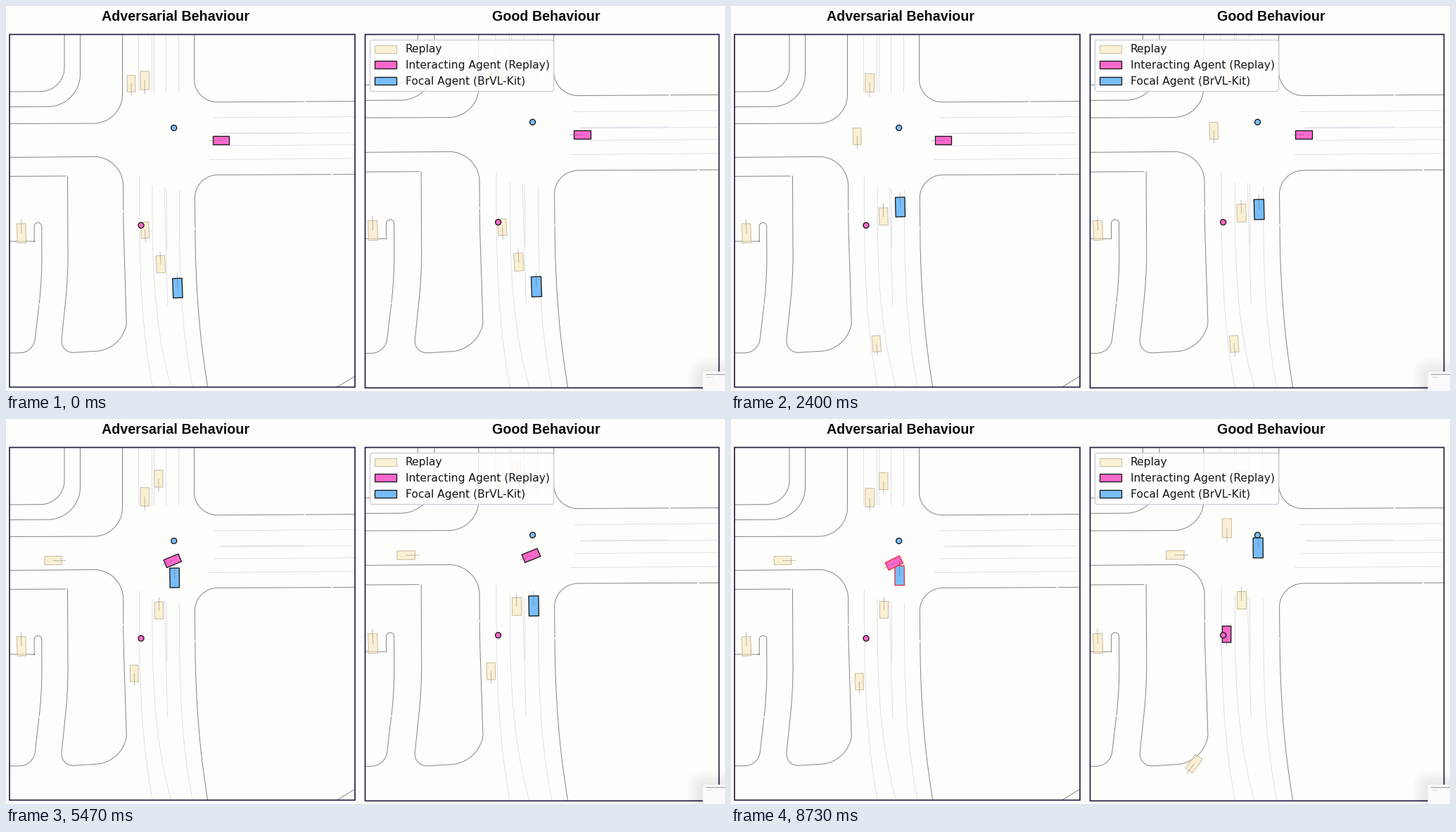
Recreate the animation shown at these times as a matplotlib script. Size 1022 by 548 pixels, loop 8.8 s.

```python
import numpy as np
import matplotlib.pyplot as plt
from matplotlib.animation import FuncAnimation
from matplotlib.patches import Circle, FancyBboxPatch, Polygon, Rectangle

W, H, DPI = 1022, 548, 128
LOOP_MS, FRAMES = 8800, 132
CRASH = 85            # step at which the left run ends in a collision
PX = 72 / DPI

PAPER, BORDER = "#fdfdfc", "#1f2140"
ROAD, LANE = "#868686", "#dedee4"
BLUE, PINK, SAND = "#77bdfa", "#fb68cb", "#fae6b8"
INK, RED = "#151515", "#e8322f"

fig = plt.figure(figsize=(W / DPI, H / DPI), dpi=DPI, facecolor=PAPER)
ax = fig.add_axes([0, 0, 1, 1])
ax.set(xlim=(-.5, W - .5), ylim=(H - .5, -.5))   # integers are pixel centres
ax.axis("off")


def rounded(points):
    """Polyline through (x, y[, radius]) corners, each eased by a Bezier arc."""
    pts = [np.array(p[:2], float) for p in points]
    t = np.linspace(0, 1, 24)[:, None]
    out = [pts[:1]]
    for before, p, after, spec in zip(pts, pts[1:], pts[2:], points[1:]):
        r = spec[2] if len(spec) > 2 else 0
        a, b = (p + (q - p) / np.hypot(*(q - p)) * r for q in (before, after))
        c, d = a + (p - a) * .55, b + (p - b) * .55
        out.append((1 - t)**3 * a + 3 * t * (1 - t)**2 * c + 3 * t * t * (1 - t) * d + t**3 * b)
    return np.vstack(out + [pts[-1:]])


def paint(color):
    """Fill and edge style shared by cars and legend keys."""
    if color == SAND:
        return dict(fc=(SAND, .6), ec="#c6bda4", lw=PX)
    return dict(fc=color, ec=INK, lw=1.3 * PX)


class Panel:
    def __init__(self, x0, y0, x1, y1, scale, shift):
        self.scale, self.shift = np.array(scale), np.array(shift)
        self.frame = Rectangle((x0, y0), x1 - x0, y1 - y0, fc="none", ec=BORDER,
                               lw=1.7 * PX, zorder=8, snap=False)
        ax.add_patch(self.frame)

    def to(self, pts):
        return np.asarray(pts, float) * self.scale + self.shift

    def add(self, artist):
        ax.add_artist(artist)
        artist.set_clip_path(self.frame)
        return artist

    def line(self, pts, **style):
        ln, = ax.plot(*self.to(pts).T, **style)
        ln.set_clip_path(self.frame)
        return ln

    def dot(self, xy, r, **style):
        self.add(Circle(self.to(xy), r, **style))


class Car:
    """Follows a rounded route; speed is linear between (step, px per step) keys."""

    def __init__(self, panel, route, speed, size, color=SAND):
        self.panel, self.size = panel, size
        self.route = rounded(route)
        self.dist = np.r_[0, np.cumsum(np.hypot(*np.diff(self.route, axis=0).T))]
        v = np.interp(np.arange(FRAMES), *zip(*speed))
        self.travel = np.r_[0, np.cumsum((v[1:] + v[:-1]) / 2)]
        self.box = panel.add(Polygon(np.zeros((4, 2)), joinstyle="round",
                                     zorder=3 if color == SAND else 4, **paint(color)))
        self.nose = panel.line(np.zeros((2, 2)), color="#555566", alpha=.42,
                               lw=.9 * PX, zorder=5)

    def at(self, s):
        return np.array([np.interp(s, self.dist, c) for c in self.route.T])

    def pose(self, k):
        s, (length, width) = self.travel[k], self.size
        rear = max(s - length / 2, 3)       # heading follows the rear axle
        ahead = self.at(rear + 3) - self.at(rear - 3)
        ahead /= np.hypot(*ahead)
        side = np.array([-ahead[1], ahead[0]])
        mid, a, b = self.at(s), ahead * length / 2, side * width / 2
        self.box.set_xy(self.panel.to([mid + a + b, mid + a - b, mid - a - b, mid - a + b]))
        self.nose.set_data(*self.panel.to([mid, mid + ahead * length * .73]).T)


def draw_map(p):
    roads = [
        [(82.5, 25), (82.5, 121, 34), (0, 121.5)],
        [(105, 25), (105, 142.5, 46), (0, 143)],
        [(165, 25), (165, 166.5, 41), (0, 167)],
        [(267, 25), (267, 136.5, 33), (520, 135)],
        [(287, 548), (277, 480, 30), (269, 385, 50), (267.5, 240, 33), (520, 239)],
        [(0, 334.5), (39.7, 334.5), (39.7, 308, 5.2), (50.2, 308, 5.2),
         (50.5, 390, 30), (38.5, 493, 19), (0, 493.5)],
        [(0, 215), (166, 213.5, 42), (166.3, 310, 20), (171, 455, 6), (155, 489, 25),
         (76.5, 494, 20), (87.7, 385, 30), (87, 241.5), (0, 242)],
        [(470, 542), (500, 523.5)],
    ]
    for road in roads:
        p.line(rounded(road), color=ROAD, lw=PX, zorder=2)

    lane = dict(color=LANE, lw=.9 * PX, zorder=1)
    for x, top, bend in ((189, 243, 19), (207.5, 256, 27), (246, 262, 19)):
        t = np.linspace(0, 1, 40)
        p.line(np.c_[x + bend * t**3, top + (543 - top) * t], **lane)
    p.line([(224.5, 258), (229.3, 425)], **lane)
    p.line([(227.5, 260), (228.5, 345)], **lane)
    for x in (187.5, 206.5, 209.5, 226, 244.5):
        p.line([(x, 30), (x, 121)], **lane)
    for x0, x1, y in ((295, 520, 158.5), (303, 489, 181.5), (303, 423, 180.5),
                      (296, 520, 198.5), (289, 520, 218)):
        p.line([(x0, y), (x1, y - (x1 - x0) / 130)], **lane)

    for gap in ((424, 136), (463, 239.5), (268, 316), (166.3, 292), (47.3, 424), (85.5, 241.5)):
        p.dot(gap, 1.3, fc=PAPER, ec="none", zorder=2.5)
    for xy, color in (((238.2, 173), BLUE), ((191.5, 311.7), PINK)):
        p.dot(xy, 4, fc=color, ec=INK, lw=1.3 * PX, zorder=6)


def traffic(p):
    """Recorded cars, the same in both panels."""
    parked = Car(p, [(21.5, 323), (20.7, 300)], [(0, 0)], (27.3, 12.5))
    south = Car(p, [(177.5, 110), (183.5, 464, 50), (130, 509)],
                [(0, 1), (49, 3.95), (84, 3.95), (96, 2.75), (131, 2.4)], (23.5, 11.6))
    waiting = Car(p, [(196.7, 105.5), (196.5, 200)],
                  [(0, .29), (24, 0), (73, 0), (131, 1.94)], (26.3, 12.6))
    leaving = Car(p, [(197, 318.5), (202.5, 425, 40), (215, 600)],
                  [(0, 3.6), (60, 6.6)], (23, 11.5))
    north = Car(p, [(219.5, 367), (216.2, 310, 20), (216.2, 200)],
                [(0, 2.5), (65, .3), (131, .1)], (24.5, 12.4))
    late = Car(p, [(215, -96), (216.6, 120)],
               [(0, 2.5), (75, 2), (95, .1), (131, 0)], (24, 12.2))
    east = Car(p, [(-118, 202), (140, 200.5)], [(82, 2.25), (131, .2)], (24.3, 12))
    return [parked, south, waiting, leaving, north, late, east]


def turner(p):
    return Car(p, [(305.2, 190.3), (196.5, 190.3, 80), (196.2, 340)],
               [(22, 0), (57, 1.5), (72, 1.9), (98, 2), (131, 3.8)], (22.7, 11.8), PINK)


def focal(p, speed):
    return Car(p, [(243.4, 401), (239.6, 290, 70), (238.6, 150)], speed, (27.8, 13.4), BLUE)


left = Panel(4.5, 40, 495.5, 542, (1, 1), (0, 0))
right = Panel(510, 40, 1013, 543, (1.0475, 1.0275), (498.5, -13))
draw_map(left)
draw_map(right)

bold = focal(left, [(0, 4.24), (55, 1.08)])
careful = focal(right, [(0, 4.43), (51, .3), (89, .3), (131, 3.6)])
crossing = turner(left)
left_cars = traffic(left) + [bold, crossing]
right_cars = traffic(right) + [careful, turner(right)]

for x, title in ((241, "Adversarial Behaviour"), (767, "Good Behaviour")):
    ax.text(x, 20.5, title, family="Liberation Sans", weight="bold", size=19.7 * PX,
            ha="center", va="baseline", color="#0c0c0c")

# legend
ax.add_patch(FancyBboxPatch((520, 51), 255, 67, boxstyle="round,pad=3,rounding_size=3",
                            fc=("white", .8), ec="#cdcdd5", lw=1.3 * PX, zorder=9))
keys = ((SAND, "Replay"), (PINK, "Interacting Agent (Replay)"), (BLUE, "Focal Agent (BrVL-Kit)"))
for i, (color, label) in enumerate(keys):
    y = 60.5 + 22.8 * i
    ax.add_patch(Rectangle((523.5, y - 5.5), 31, 11, zorder=10, **paint(color)))
    ax.text(567, y + 5.3, label, family="DejaVu Sans", size=15.45 * PX,
            va="baseline", color=INK, zorder=10)

# small window corner with a soft shadow
for s in range(2, 26, 2):
    ax.add_patch(FancyBboxPatch((992, 524), 60, 60, fc="black", ec="none", alpha=.009,
                                boxstyle=f"round,pad={s},rounding_size={s + 2}", zorder=11))
ax.add_patch(FancyBboxPatch((992, 522), 60, 60, boxstyle="round,pad=2,rounding_size=2",
                            fc="#fafafa", ec="none", zorder=12))
ax.plot([994, 1022], [523.5, 523.5], color="#a9a9ad", lw=1.3 * PX, zorder=13)
ax.plot([995, 1003], [527.5, 527.5], color="#dddde0", lw=PX, zorder=13)


def update(k):
    for car in left_cars:
        car.pose(min(k, CRASH))
    for car in right_cars:
        car.pose(k)
    for car in (bold, crossing):
        car.box.set_edgecolor(RED if k >= CRASH else INK)
    return []


anim = FuncAnimation(fig, update, frames=FRAMES, interval=LOOP_MS / FRAMES,
                     init_func=lambda: update(0), repeat=True, repeat_delay=0, blit=False)
plt.show()
```
